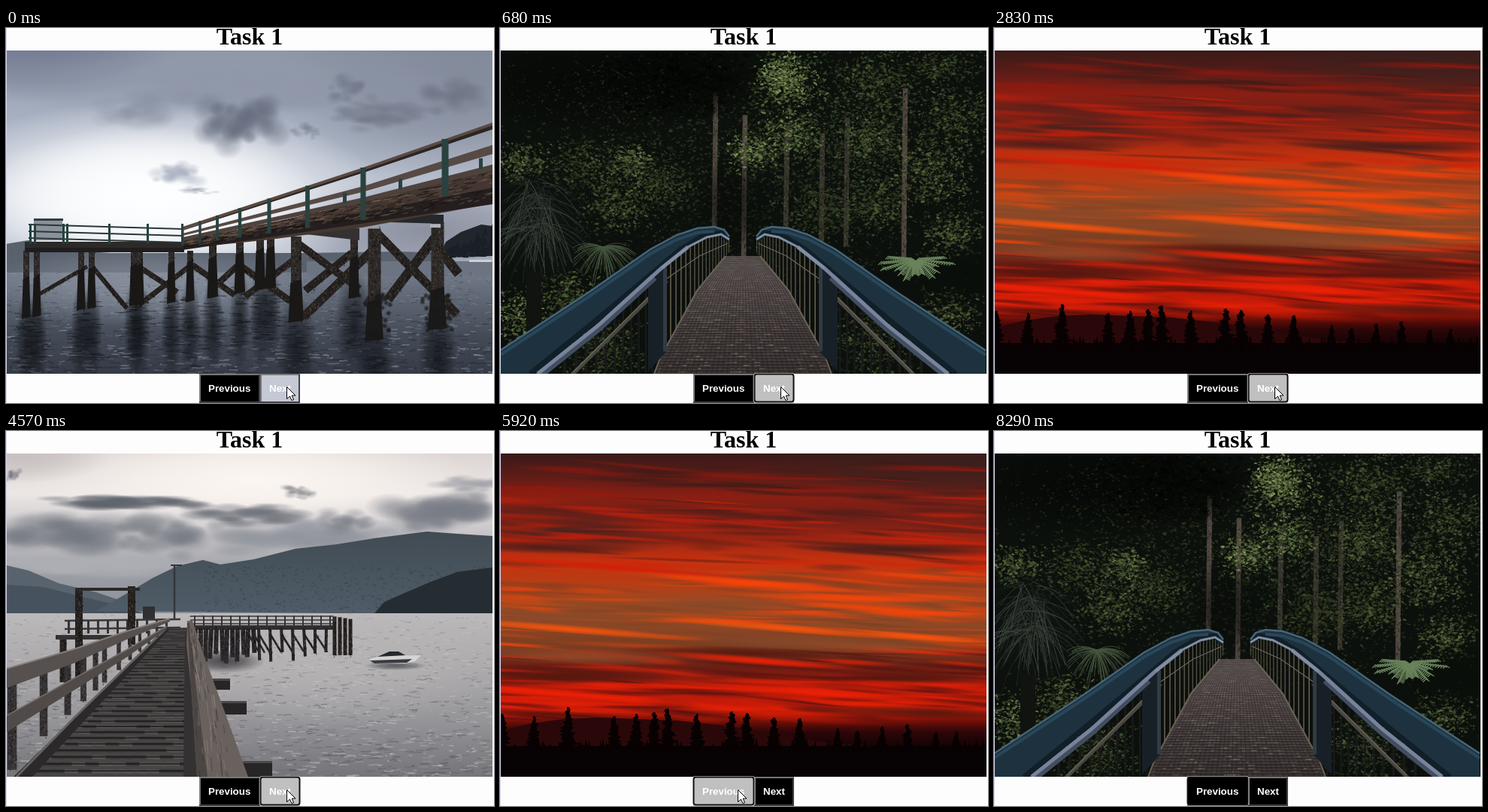
These frames come from a looping animation (649 by 500 pixels, 9.19 s). An HTML page with a canvas:

```html
<!DOCTYPE html>
<html lang="en">
<head>
<meta charset="utf-8">
<title>Task 1</title>
<style>
html, body { margin: 0; width: 100%; height: 100%; overflow: hidden; background: #fdfdfe; }
canvas { display: block; width: 649px; height: 500px; }
</style>
</head>
<body>
<canvas id="stage" width="649" height="500"></canvas>
<script>
const W = 649, H = 500, LOOP = 9190;
const stage = document.getElementById('stage').getContext('2d');
let g = stage, seed = 1;

function rnd(a = 0, b = 1) {
  seed = (seed + 0x6D2B79F5) | 0;
  let t = Math.imul(seed ^ seed >>> 15, 1 | seed);
  t = t + Math.imul(t ^ t >>> 7, 61 | t) ^ t;
  return a + (b - a) * ((t ^ t >>> 14) >>> 0) / 4294967296;
}
const spread = () => rnd() + rnd() - 1;
const times = (n, f) => { for (let i = 0; i < n; i++) f(i); };
const tint = (hex, a) => hex + Math.round(a * 255).toString(16).padStart(2, '0');
const pick = (a, b) => rnd() < .5 ? a : b;

function trace(p) {
  g.beginPath();
  for (let i = 0; i < p.length; i += 2) g.lineTo(p[i], p[i + 1]);
}
function poly(color, ...p) { trace(p); g.fillStyle = color; g.fill(); }
function line(color, w, ...p) { trace(p); g.strokeStyle = color; g.lineWidth = w; g.stroke(); }
function rect(color, x, y, w, h) { g.fillStyle = color; g.fillRect(x, y, w, h); }
function oval(x, y, rx, ry, turn) { g.beginPath(); g.ellipse(x, y, rx, ry, turn, 0, 7); g.fill(); }

function fade(y0, y1, ...stops) {
  const f = g.createLinearGradient(0, y0, 0, y1);
  stops.forEach((c, i) => f.addColorStop(i / (stops.length - 1), c));
  return f;
}
// Soft ellipse
function glow(x, y, rx, ry, color, a = 1, turn = 0) {
  g.save();
  g.translate(x, y);
  g.rotate(turn);
  g.scale(rx, ry);
  const f = g.createRadialGradient(0, 0, 0, 0, 0, 1);
  f.addColorStop(0, tint(color, a));
  f.addColorStop(.5, tint(color, a * .65));
  f.addColorStop(1, tint(color, 0));
  g.fillStyle = f;
  g.fillRect(-1, -1, 2, 2);
  g.restore();
}
function cloud(x, y, rx, ry, color, a = .38) {
  times(14 + rx / 4, () => {
    const s = rnd(.18, .45);
    glow(x + spread() * rx, y + spread() * ry, rx * s, ry * s * 1.5, color, a);
  });
}
function ripples(y0, n, light, dark) {
  times(n, () => {
    const d = rnd(), y = y0 + (461 - y0) * d, x = rnd(0, W), len = rnd(2, 6 + 12 * d);
    line(tint(pick(light, dark), rnd(.12, .42)), .6 + d * 1.1,
      x, y, x + len / 2, y + rnd(-1, 1), x + len, y + rnd(-1, 1));
  });
}
// Weathered timber: dark stroke with flecks along it
function timber(x0, y0, x1, y1, w, color = '#25211f') {
  line(color, w, x0, y0, x1, y1);
  times(Math.hypot(x1 - x0, y1 - y0) * w / 12, () => {
    const k = rnd();
    rect(pick('#73696266', '#08080a80'),
      x0 + (x1 - x0) * k + rnd(-w, w) * .45, y0 + (y1 - y0) * k + rnd(-w, w) * .45, 1.2, 2.2);
  });
}
// Height of a piecewise line at x
function at(p, x) {
  let i = 0;
  while (i < p.length - 4 && x > p[i + 2]) i += 2;
  return p[i + 1] + (p[i + 3] - p[i + 1]) * (x - p[i]) / (p[i + 2] - p[i]);
}
// Board between an upper line and the same line reversed lower down
function board(color, p, h0, h1) {
  const low = [], n = p.length;
  for (let i = n - 2; i >= 0; i -= 2) low.push(p[i], p[i + 1] + h0 + (h1 - h0) * i / (n - 2));
  poly(color, ...p, ...low);
}

function pier() {
  rect(fade(30, 320, '#8f98a8', '#a9b2c3', '#bfc6d3', '#b4bbc9'), 0, 30, W, 300);
  glow(40, 20, 190, 80, '#69728a', .8);
  glow(600, 80, 260, 130, '#787f8f', .75);
  glow(560, 270, 200, 70, '#808594', .8);
  cloud(330, 70, 300, 45, '#8c94a6', .15);
  glow(190, 222, 310, 125, '#fdfeff');
  glow(190, 225, 230, 95, '#fdfeff');
  cloud(315, 128, 58, 36, '#5b6273');
  cloud(222, 195, 40, 15, '#a0a7b7');
  cloud(255, 216, 26, 5, '#a5abb8');
  cloud(500, 118, 70, 18, '#686e7e', .28);
  cloud(455, 80, 35, 18, '#6c7384', .3);
  cloud(400, 138, 22, 10, '#737a8b', .3);
  cloud(180, 110, 60, 22, '#828a9b', .2);
  cloud(600, 90, 50, 22, '#686f7e', .28);
  poly('#59616d', 0, 288, 30, 283, 70, 296, 140, 300, 400, 300, 520, 298, 590, 300, 590, 332, 0, 332);
  rect(fade(308, 461, '#7c8491', '#606875', '#444b57', '#353b46'), 0, 326, W, 140);
  rect('#6c7481', 400, 311, 250, 20);
  glow(190, 345, 230, 55, '#b2bac9', .4);
  poly('#20262c', 575, 306, 585, 285, 605, 272, 632, 262, 647, 264, 647, 304);
  times(60, () => {
    const x = rnd(586, 648), y = 300 - rnd(0, (x - 580) * .55);
    poly('#1a2026', x - 4, y + 7, x, y - 4, x + 4, y + 7);
  });
  rect('#cdd2da', 616, 309, 30, 3);
  ripples(325, 1500, '#b4bcca', '#181c24');

  const foot = [27, 385, 114, 372, 245, 363, 352, 345, 386, 390, 463, 358, 490, 415, 574, 400];
  const piles = [27, 41, 100, 114, 170, 178, 220, 245, 275, 311, 338, 352, 386, 463, 490, 574];
  for (const x of piles) {
    const y = at(foot, x);
    glow(x, y + 35, x > 370 ? 26 : 14, 70, '#111318', .75);
    times(35, () => rect('#12141873', x + spread() * 20 - 6, y + rnd(-8, 70), rnd(5, 16), 1.3));
  }
  const braces = [[44, 355, 108, 318], [112, 315, 161, 374], [172, 373, 245, 317], [176, 318, 228, 352],
    [248, 316, 304, 356], [272, 350, 310, 315], [313, 318, 378, 364], [318, 358, 382, 310], [388, 287, 470, 348],
    [398, 350, 460, 300], [494, 290, 395, 386], [492, 272, 600, 382], [570, 280, 508, 362], [568, 285, 602, 328]];
  for (const b of braces) timber(...b, 4.5 + b[0] / 70);
  for (const x of piles) {
    const y = at(foot, x), w = x > 480 ? 17 : x === 386 ? 14 : x > 260 ? 10 : 8;
    timber(x, x < 265 ? 297 : 290 - (x - 265) * .1, x, y, w, '#2d2927');
    poly('#191817', x - w * .55, y - 50, x + w * .5, y - 55, x + w * .7, y, x - w * .75, y + 3);
  }
  times(130, () => glow(pick(492, 574) + spread() * 23, rnd(355, 403), 4, 4, '#1b1a1a', .9));
  poly('#343132', 372, 262, 470, 267, 470, 283, 372, 272);
  poly('#25272b', 475, 246, 582, 249, 582, 261, 475, 258);
  for (const x of [304, 478, 564]) rect('#b0b4bb', x, x < 400 ? 278 : x / 20 + 233, 14, 5);
  rect('#8b9199', 37, 255, 38, 28);
  rect('#343b42', 37, 254, 39, 3);
  rect('#2c2927', 25, 285, 212, 8);
  rect('#1e1d1f', 25, 293, 212, 6);
  times(3, i => line('#2b363a', 2.2, 30, 262 + i * 9, 235, 268 + i * 9));
  for (const x of [31, 37, 75, 80, 136, 187, 233]) rect('#24423f', x, 261, 3, 27);
  board('#443731', [235, 283, 350, 260, 475, 232, 647, 189], 11, 45);
  board('#241f1e', [235, 289, 475, 246, 647, 213], 7, 22);
  times(420, () => {
    const x = rnd(235, 645), y = 283 - (x - 235) * .228 + rnd(0, 10 + (x - 235) * .075);
    line(pick('#876e5c66', '#0f0c0c80'), 1.2, x, y, x + rnd(3, 13), y - 2);
  });
  const rail = [235, 265, 475, 186, 647, 126], floor = [235, 290, 475, 256, 584, 224, 647, 205];
  board('#5a4a42', rail, 4, 9);
  board('#2b2523', rail.map((v, i) => i % 2 ? v + 4 : v), 1, 5);
  board('#574a44', [235, 274, 475, 211, 647, 156], 3, 12);
  board('#4d423d', [235, 279, 475, 226, 647, 182], 5, 8);
  for (const x of [235, 258, 281, 311, 350, 401, 475, 584]) {
    const w = 3 + (x - 235) / 58, y = at(rail, x);
    rect('#29423f', x - w / 2, y, w, at(floor, x) - y);
  }
  for (const x of [450, 524, 631]) rect('#29423f', x - 2, 334 - x * .254, 5, 14);
}

function leaves(x, y, rx, ry, n, rgb, size = 3) {
  times(n, () => {
    const k = rnd(.35, 1.25);
    g.fillStyle = `rgba(${rgb.map(v => v * k | 0)},${rnd(.45, .9)})`;
    oval(x + spread() * rx, y + spread() * ry, rnd(.5, size), rnd(.4, size * .55), rnd(-.7, .7));
  });
}
const leafGreen = v => [v * .85, v, v * .58];

function frond(x, y, a, len, color) {
  const dx = Math.cos(a) * len, dy = Math.sin(a) * len;
  g.beginPath();
  g.moveTo(x, y);
  g.quadraticCurveTo(x + dx * .6, y + dy * .6 - len * .15, x + dx, y + dy + len * .2);
  g.strokeStyle = color;
  g.lineWidth = .8;
  g.stroke();
}
function railing() {
  const top = [0, 430, 120, 351, 200, 295, 235, 276, 262, 267, 285, 265, 298, 269, 305, 278];
  const under = [303, 283, 294, 273, 270, 277, 240, 295, 205, 325, 125, 392, 40, 461, 0, 461];
  const tube = [50, 461, 130, 397, 215, 320, 250, 292, 275, 279, 294, 275, 305, 282];
  const edge = [205, 461, 213, 440, 262, 350, 300, 304];
  trace([...tube.slice(4), 305, 303, ...edge.slice().reverse().flatMap((v, i, a) => i % 2 ? [v, a[i - 1]] : [])]);
  g.fillStyle = '#0d100c99';
  g.fill();
  for (let x = 84, step = 15; x < 304; x += step, step = Math.max(2.6, step * .945)) {
    const y = at(tube, x);
    rect(x > 225 ? '#5a5748' : '#171a19', x, y, Math.max(1, step * .25), (x < 205 ? 461 : at(edge, x)) - y);
  }
  line('#4a4740', 5, 95, 463, 185, 374, 222, 337);
  line('#6b665a', 1.2, 97, 459, 185, 371, 222, 334, 265, 304, 303, 287);
  line('#6a6254', 2, ...edge);
  poly('#172027', 197, 336, 220, 319, 220, 433, 197, 458);
  rect('#303b43', 217, 319, 5, 112);
  poly('#1d323e', ...top, ...under);
  trace(under.slice(0, -2));
  g.save();
  g.translate(-1, -4);
  g.strokeStyle = '#111f29';
  g.lineWidth = 7;
  g.stroke();
  g.restore();
  line('#476678', 2.4, ...top);
  line('#29465a', 4, ...top.slice(0, 12).map((v, i) => i % 2 ? v + 6 : v));
  line('#424e60', 10, 50, 465, 130, 401, 205, 332);
  line('#76839a', 5, ...tube.slice(0, 8));
  line('#8290a2', 3, ...tube.slice(4));
}
function forest() {
  rect('#0c100c', 0, 30, W, 432);
  leaves(324, 190, 330, 200, 4500, [48, 58, 38]);
  leaves(500, 150, 180, 140, 2200, [60, 74, 45]);
  for (const [x, a, b] of [[285, 90, 268], [324, 116, 304], [380, 130, 266], [427, 140, 290], [460, 120, 292], [537, 80, 306]])
    timber(x + 2, a, x, b, 6.5, x > 350 && x < 500 ? '#35342b' : '#4c443c');
  const clumps = [[385, 75, 55, 130], [375, 60, 38, 155], [335, 165, 40, 136], [385, 140, 48, 126], [176, 180, 32, 116],
    [155, 235, 50, 93], [215, 210, 50, 80], [110, 185, 55, 76], [30, 180, 40, 108], [575, 195, 58, 102], [490, 145, 52, 95],
    [610, 120, 60, 84], [600, 275, 45, 96], [500, 235, 48, 86], [430, 245, 52, 68], [500, 70, 58, 82],
    [25, 385, 52, 121], [90, 355, 46, 100], [600, 380, 45, 100], [500, 420, 70, 83], [140, 430, 65, 84]];
  for (const [x, y, r, v] of clumps) leaves(x, y, r, r * .8, r * 9, leafGreen(v));
  leaves(590, 50, 60, 25, 280, leafGreen(80));
  glow(120, 70, 220, 75, '#040705', .85);
  glow(240, 65, 120, 65, '#030604', .9);
  glow(310, 235, 60, 65, '#070a07', .65);
  glow(620, 330, 100, 45, '#090d08', .75);
  leaves(150, 90, 170, 85, 600, leafGreen(44), 2.5);
  leaves(240, 65, 110, 60, 500, leafGreen(11), 6);
  glow(50, 265, 75, 90, '#0e1311', .95);
  times(190, () => {
    const v = rnd(20, 72) | 0;
    frond(48 + spread() * 22, 235 + rnd(-35, 45), rnd(0, Math.PI), rnd(25, 75), `rgb(${v},${v * 1.15 | 0},${v})`);
  });
  times(70, () => frond(137, 292, rnd(-.3, 3.4), rnd(18, 45), '#46563e'));
  rect('#10130f', 35, 325, 20, 80);
  times(13, i => {
    const a = -.1 + i * .28, len = rnd(30, 52);
    for (let k = .15; k < 1; k += .07) {
      const x = 552 + Math.cos(a) * len * k, y = 307 + Math.sin(a) * len * k * .65;
      line('#6a845c', 1.3, x - 4, y + 4, x, y, x + 5, y + 3);
    }
  });
  poly(fade(304, 461, '#736a68', '#5a5150', '#473f3e', '#3c3534'), 300, 304, 346, 304, 384, 350, 433, 440, 441, 461, 205, 461, 213, 440, 262, 350);
  for (let y = 305, s = 1.6; y < 461; y += s, s *= 1.018) {
    const l = y < 350 ? 300 - (y - 304) * .83 : 262 - (y - 350) * .53;
    line('#1915158c', s * .35, l, y, 646 - l, y);
    times(14, () => {
      const x = rnd(l, 636 - l);
      line(tint('#a59691', rnd(.08, .35)), s * .35, x, y + 1, x + rnd(2, 10), y + 1);
    });
  }
  times(33, i => {
    const k = (i + 1) / 34;
    line('#16121259', 1, 300 + 46 * k, 304, 262 + 122 * k, 350, 205 + 236 * k, 461);
  });
  railing();
  g.save();
  g.translate(646, 0);
  g.scale(-1, 1);
  railing();
  g.restore();
}

function sunset() {
  rect(fade(30, 430, '#381a18', '#5b1c17', '#891f13', '#701f17', '#9c2412', '#c4330f', '#b83c14', '#9b4a22', '#8d4825',
    '#7c3c20', '#6b1d13', '#b41a09', '#cf1c07', '#7e1109', '#2c0506'), 0, 30, W, 432);
  glow(600, 45, 260, 55, '#3a201d', .9);
  glow(80, 130, 170, 26, '#44231f', .9, .1);
  const hot = y => y < 90 ? '#96180e' : y < 185 ? '#d21e08' : y < 290 ? '#fa4408' : '#f02005';
  const dull = y => y < 90 ? '#3c1a17' : y < 185 ? '#4c1d18' : y < 290 ? '#7a3e22' : '#48100e';
  times(380, () => {
    const y = rnd(42, 388);
    glow(rnd(-30, 680), y, rnd(35, 140), rnd(1.5, 6), pick(hot, dull)(y), rnd(.3, .75), rnd(0, .11));
  });
  const haze = [[60, 248, 130], [440, 283, 220], [100, 300, 150], [300, 230, 140]];
  for (const [x, y, r] of haze) glow(x, y, r, 12, '#86492a', .95, .04);
  const shade = [[60, 155, 140], [530, 158, 160], [330, 296, 170], [90, 327, 150], [550, 328, 100], [550, 375, 180]];
  for (const [x, y, r] of shade) glow(x, y, r, 9, y < 200 ? '#421d1b' : '#54180f', .9, .03);
  const streaks = [[150, 182, 210], [330, 202, 190], [510, 238, 170], [90, 264, 190], [380, 263, 180],
    [560, 275, 110], [340, 306, 150], [130, 354, 190], [430, 350, 230]];
  for (const [x, y, r] of streaks) glow(x, y, r, 6, y > 255 && y < 280 ? '#ff540a' : hot(y), .95, .08);
  rect(fade(375, 430, '#30060700', '#2b0608', '#080203'), 0, 375, W, 60);
  poly('#2a0809', 0, 400, 40, 390, 85, 384, 130, 382, 235, 386, 300, 393, 370, 404, 440, 416, 500, 420, 500, 440, 0, 440);
  rect('#070203', 0, 420, W, 42);
  const trees = [3, 377, 45, 380, 90, 368, 152, 380, 181, 377, 205, 375, 223, 370, 262, 377, 308, 374,
    328, 376, 364, 382, 399, 383, 449, 396, 475, 400, 508, 394, 542, 391, 580, 402, 607, 401];
  for (let i = 0; i < trees.length; i += 2) {
    const x = trees[i], y = trees[i + 1];
    rect('#080203', x - 1, y, 2.5, 50);
    for (let k = 0; k < 1; k += .035) {
      const w = (2.5 + k * 11) * rnd(.5, 1.1) * (428 - y) / 52;
      oval(x + rnd(-2, 2), y + 3 + k * (426 - y), w, 2.3, rnd(-.3, .3));
    }
  }
  times(150, () => {
    const x = rnd(0, W);
    poly('#080203', x - 4, 432, x, rnd(410, 424), x + 4, 432);
  });
}

function dock() {
  rect(fade(30, 245, '#dcd5d3', '#ece6e4', '#c6c4c7', '#9b9da4', '#8b8f98'), 0, 30, W, 215);
  glow(330, 65, 300, 70, '#fcf6f2');
  glow(20, 35, 120, 35, '#beb7b8', .7);
  cloud(85, 138, 115, 28, '#70757e', .32);
  cloud(215, 142, 65, 26, '#767a83', .36);
  cloud(400, 142, 130, 24, '#8e929a', .32);
  cloud(450, 122, 45, 15, '#80838b');
  cloud(150, 95, 112, 11, '#5b6069', .42);
  cloud(320, 111, 92, 13, '#676b74');
  cloud(580, 107, 82, 28, '#767a83', .42);
  cloud(620, 70, 50, 9, '#9b9ca3', .35);
  cloud(390, 82, 25, 8, '#797b82');
  cloud(6, 59, 13, 8, '#70727a', .45);
  cloud(100, 180, 160, 13, '#aeb0b5', .25);
  poly('#58636e', 0, 179, 30, 186, 70, 203, 120, 215, 170, 232, 170, 245, 0, 245);
  poly('#46525d', 0, 205, 50, 208, 105, 222, 150, 232, 190, 245, 0, 245);
  poly(fade(135, 245, '#414b53', '#48545e', '#505d68'), 120, 240, 165, 214, 195, 196, 228, 180, 262, 172, 285, 178, 330, 171,
    385, 157, 440, 151, 490, 143, 560, 134, 600, 137, 647, 140, 647, 245);
  times(500, () => rect('#2832394d', rnd(260, 647), rnd(180, 240), rnd(1, 4), 1.5));
  poly('#252c32', 490, 243, 503, 228, 530, 216, 565, 201, 600, 188, 647, 182, 647, 243);
  rect(fade(243, 461, '#bcb9bb', '#aaa8aa', '#949397', '#747479'), 0, 243, W, 220);
  glow(420, 320, 260, 75, '#bebbbb', .55);
  ripples(244, 2100, '#dcd8d7', '#484950');

  rect('#302e2f', 245, 259, 190, 6);
  for (let x = 252; x < 435; x += x < 330 ? 7 : 15) {
    const y = 304 - (x - 250) * .03;
    timber(x, 262, x + rnd(-2, 2), y + rnd(-6, 7), x < 330 ? 6 : 4, '#272527');
    if (x > 320 && x < 425) timber(x, 270, x + 15, y - 6, 2.5);
  }
  glow(290, 307, 55, 16, '#2d2c2f', .8);
  times(3, i => line('#373536', 1.7, 245, 247 + i * 5, 435, 247 + i * 5));
  times(16, i => rect('#343234', 250 + i * 12, 246, 2, 16));
  times(4, i => timber(437 + i * 7, 247 + rnd(0, 4), 437 + i * 7, 299, 5));
  line('#33363a', 2.5, 224, 252, 224, 179);
  line('#33363a', 2, 219, 179, 234, 179);
  rect('#303033', 182, 234, 16, 18);
  for (const y of [253, 264]) line('#393839', 2.5, 78, y, 232, y - 2);
  times(11, i => rect('#343335', 82 + i * 13, 252, 3, 18));
  rect('#343334', 66, 272, 80, 6);
  timber(97, 210, 97, 330, 10);
  timber(167, 207, 167, 285, 10);
  timber(76, 278, 76, 335, 9);
  rect('#2a292a', 92, 209, 86, 4);
  poly('#474444', 214, 263, 242, 262, 255, 461, 16, 461, 90, 389);
  for (let y = 264, s = 2; y < 461; y += s, s *= 1.042) {
    const l = 216 - (y - 263) * 1.01;
    for (let x = l; x < 248; x += 18) line(pick('#827c7859', '#23212159'), s * .5, x, y, x + 18, y + rnd(0, 1));
    line('#161516bf', Math.min(2, s * .25), l, y, 248, y);
  }
  poly('#2b292a', 213, 263, 218, 264, 35, 461, 10, 461);
  line('#676160', 3, 212, 264, 90, 383, 14, 461);
  const rail = [0, 317, 90, 291, 160, 267, 218, 250], middle = [0, 380, 90, 330, 160, 292, 214, 260];
  const foot = [0, 461, 14, 445, 50, 407, 119, 346, 178, 294, 214, 264];
  for (const x of [8, 50, 82, 103, 119, 131, 150, 165, 178, 190, 201])
    timber(x, at(rail, x) + 8, x, at(foot, x), 13 - x / 20, '#353233');
  board('#504b49', middle, 22, 4);
  board('#56504e', rail, 26, 4);
  line('#857d79', 2, ...rail);
  line('#756d69', 1.5, ...middle);
  for (const [x, y, w, h] of [[270, 330, 28, 15], [282, 360, 38, 18], [300, 440, 54, 22]]) {
    rect('#272526', x, y, w, h);
    rect('#4b4848', x, y, w, 3);
  }
  poly('#343132', 238, 268, 243, 262, 256, 461, 236, 461);
  poly('#69615d', 241, 253, 248, 253, 265, 304, 290, 372, 322, 461, 254, 461, 246, 340, 240, 285);
  poly('#4b4643', 241, 256, 244, 256, 252, 335, 268, 461, 254, 461, 246, 340);
  times(85, () => {
    const k = rnd(), y = 262 + k * 195, x = 244 + k * 12 + rnd(0, 5 + k * 49);
    line(pick('#a0948c59', '#2d282659'), 1.2, x, y, x + 2, y + rnd(5, 20));
  });
  glow(518, 313, 42, 6, '#37383d', .7);
  poly('#d5d3d3', 483, 304, 500, 300, 552, 299, 544, 307, 530, 310, 490, 310);
  poly('#3a3b40', 484, 306, 540, 304, 533, 309, 490, 310);
  poly('#26282c', 494, 301, 510, 294, 522, 294, 531, 299);
}

const scenes = [pier, forest, sunset, dock].map((draw, i) => {
  const c = document.createElement('canvas');
  c.width = W;
  c.height = H;
  g = c.getContext('2d');
  seed = 71 + i * 100;
  g.beginPath();
  g.rect(1, 30, 646, 431);
  g.clip();
  draw();
  return c;
});
g = stage;

// Each row: start time, value
const slides = [[0, 0], [680, 1], [2830, 2], [4570, 3], [5920, 2], [7450, 1]];
const focuses = [[0, ''], [400, 'Next'], [5780, 'Previous']];
const hovers = [[0, 'Next'], [5530, ''], [5660, 'Previous'], [7900, '']];
const pointer = [[0, [373, 478]], [5260, [368, 478]], [5390, [362, 478]], [5530, [337, 478]], [5660, [320, 478]],
  [5780, [316, 478]], [7900, [493, 480]], [8050, [539, 483]], [8170, [540, 494]], [8290, null]];
const now = (rows, t) => rows.filter(r => r[0] <= t).pop()[1];

function button(label, x, w, hover, focus, silver) {
  rect(hover ? silver : '#000', x, 461, w, 39);
  if (!focus) {
    line('#77777a', 2, x, 462, x + w, 462);
    line('#77777a', 2, x + 1, 461, x + 1, 500);
    line('#414144', 2, x + w - 1, 462, x + w - 1, 499, x, 499);
  }
  g.font = 'bold 13.333px "Liberation Sans", Arial, sans-serif';
  g.textAlign = 'left';
  g.fillStyle = '#fff';
  g.fillText(label, x + 12, 485);
}
function ring(x, w) {
  for (const [color, width, inset] of [['#fff', 1, .5], ['#101010', 2, 1.5]]) {
    g.beginPath();
    g.roundRect(x + inset - 1, 460 + inset, w + 2 - inset * 2, 40 - inset * 2, 3);
    g.strokeStyle = color;
    g.lineWidth = width;
    g.stroke();
  }
}
function arrow(x, y) {
  g.save();
  g.translate(x + .5, y + .5);
  poly('#fff', 0, 0, 0, 16, 4, 12.5, 6.5, 18, 9, 17, 6.7, 11.5, 11.5, 11.5);
  g.closePath();
  g.strokeStyle = '#000';
  g.lineWidth = 1;
  g.stroke();
  g.restore();
}

function frame() {
  const t = performance.now() % LOOP;
  const slide = now(slides, t), hover = now(hovers, t), focus = now(focuses, t), tip = now(pointer, t);
  rect('#fdfdfe', 0, 0, W, H);
  rect('#d9d9ee', 0, 0, 1, H);
  g.font = 'bold 32px "Liberation Serif", "Times New Roman", serif';
  g.textAlign = 'center';
  g.fillStyle = '#000';
  g.fillText('Task 1', 324, 22);
  g.drawImage(scenes[slide], 0, 0);
  const silver = slide ? '#c0c0c0' : '#c5c9d5';
  const bounds = { Previous: [257, 81], Next: [338, 53] };
  for (const name in bounds) button(name, ...bounds[name], hover === name, focus === name, silver);
  if (focus) ring(...bounds[focus]);
  if (tip) arrow(...tip);
  requestAnimationFrame(frame);
}
frame();
</script>
</body>
</html>
```
